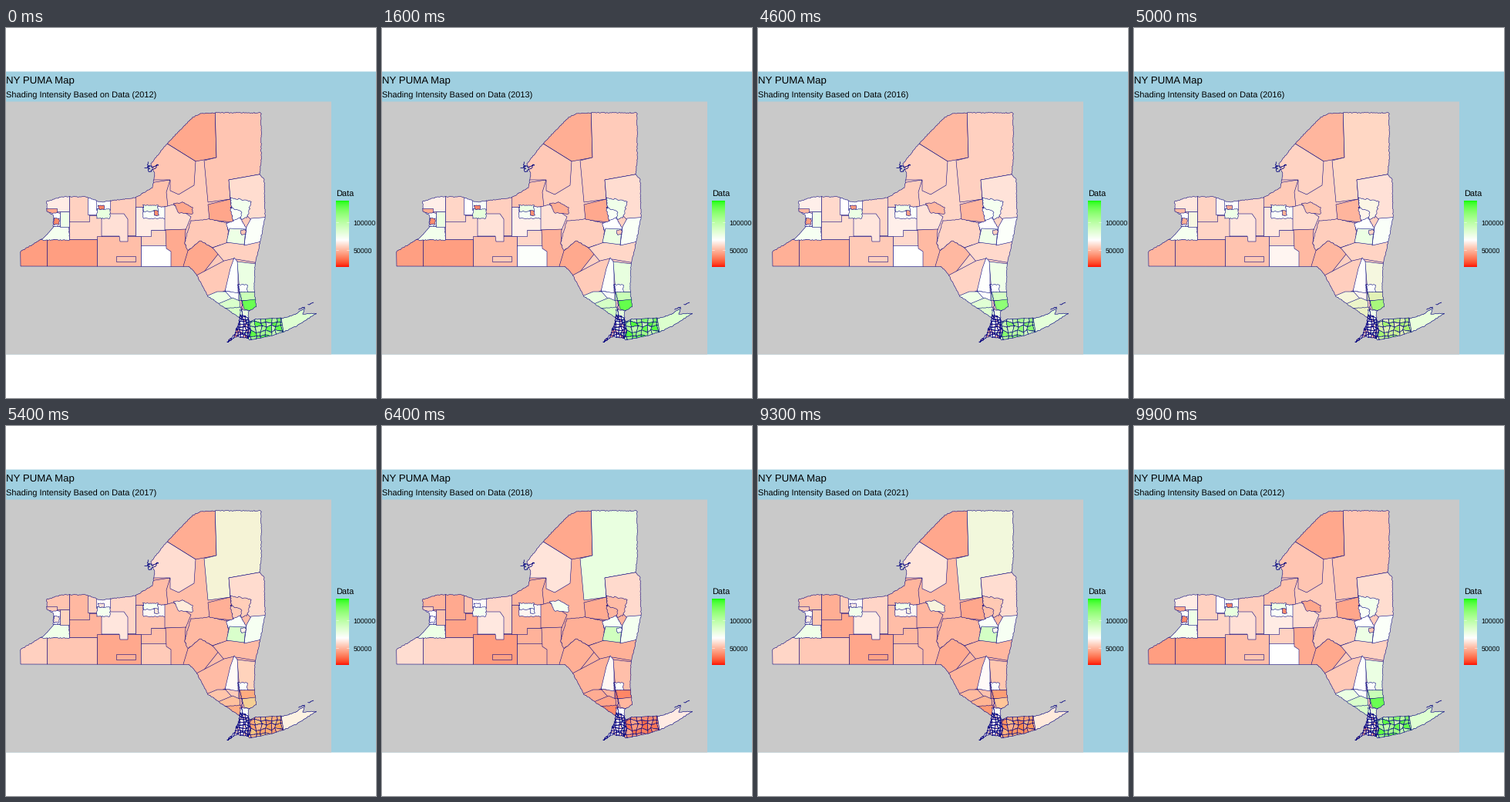
A matplotlib script that plays this animation: 480x480 px, repeating every 10000 ms.

```python
import numpy as np
import matplotlib.pyplot as plt
from matplotlib.animation import FuncAnimation
from matplotlib.collections import PolyCollection
from matplotlib.patches import Polygon, Rectangle

plt.rcParams["text.hinting"] = "none"
SIZE, DPI = 480, 80
PX = 72 / DPI
NAVY = "#00007f"
YEARS = [*range(2012, 2020), 2021]
# first and last frame of each blend into the following year
SPANS = [(4, 13), (16, 23), (28, 36), (39, 46), (50, 56),
         (60, 66), (74, 78), (82, 90), (93, 99)]

WHITE = np.array([100.0, 0, 0])
RED = np.array([53.2, 80.1, 67.2])
GREEN = np.array([87.7, -86.2, 83.2])
XYZ_TO_RGB = np.array([[3.2406, -1.5372, -0.4986],
                       [-0.9689, 1.8758, 0.0415],
                       [0.0557, -0.2040, 1.0570]])
rng = np.random.default_rng(12)
layers = []


def shade(v):
    """Lab colour on the red - white - green scale, v in -1..1."""
    v = np.asarray(v, float)[..., None]
    t = np.abs(v)
    return WHITE * (1 - t) + np.where(v < 0, RED, GREEN) * t


def lab_to_rgb(lab):
    fy = (lab[..., 0] + 16) / 116
    f = np.stack([fy + lab[..., 1] / 500, fy, fy - lab[..., 2] / 200], -1)
    xyz = np.where(f > 6 / 29, f ** 3, 3 * (6 / 29) ** 2 * (f - 4 / 29))
    lin = np.clip((xyz * [0.9505, 1, 1.089]) @ XYZ_TO_RGB.T, 0, 1)
    return np.where(lin > 0.0031308,
                    1.055 * np.maximum(lin, 1e-9) ** (1 / 2.4) - 0.055, 12.92 * lin)


def series(early, late):
    """Yearly values: slow rise to 2015, a flatter 2016, then a new level."""
    rise, step = rng.uniform(0, 0.08), rng.uniform(-0.01, 0.015)
    first = [early + rise * i / 3 for i in range(4)]
    return first + [0.82 * early] + [late + step * i for i in range(4)]


def rough(points, amp):
    """Resample a path every 1.5 px with a little noise."""
    p = np.asarray(points, float)
    dist = np.r_[0, np.cumsum(np.hypot(*np.diff(p, axis=0).T))]
    s = np.linspace(0, dist[-1], int(dist[-1] / 1.5) + 2)
    path = np.stack([np.interp(s, dist, p[:, i]) for i in (0, 1)], -1)
    return path + rng.uniform(-amp, amp, path.shape)


def region(early, late, *xy, rag=0):
    p = np.reshape(xy, (-1, 2)).astype(float)
    if rag:
        p = rough(np.vstack([p, p[:1]]), rag)
    return p, series(early / 100, late / 100)


def box(early, late, x0, y0, x1, y1, rag=0):
    return region(early, late, x0, y0, x1, y0, x1, y1, x0, y1, rag=rag)


def net(xs, ys, jitter, early, late):
    """Jittered grid cells with values drawn from two ranges."""
    gx, gy = np.meshgrid(xs, ys)
    g = np.stack([gx, gy], -1) + rng.uniform(-jitter, jitter, gx.shape + (2,))
    return [region(rng.uniform(*early), rng.uniform(*late),
                   *np.ravel([g[i, j], g[i, j + 1], g[i + 1, j + 1], g[i + 1, j]]),
                   rag=0.35)
            for i in range(len(ys) - 1) for j in range(len(xs) - 1)]


def add_layer(outline, regions, lw):
    """Regions painted in order and cut off at the outline."""
    shapes, levels = zip(*regions)
    mesh = PolyCollection(shapes, edgecolors=NAVY, linewidths=lw * PX)
    ax.add_collection(mesh, autolim=False)
    edge = ax.add_patch(Polygon(outline, fc="none", ec=NAVY, lw=lw * PX, zorder=3))
    mesh.set_clip_path(edge)
    layers.append((mesh, shade(levels)))


def label(x, y, text, size):
    return ax.text(x, y, text, fontsize=size * PX, family="Liberation Sans")


fig = plt.figure(figsize=(SIZE / DPI, SIZE / DPI), dpi=DPI, facecolor="white")
ax = fig.add_axes([0, 0, 1, 1])
ax.axis("off")
ax.add_patch(Rectangle((0, 56.5), 480, 367, fc="#9fcfe0", lw=0, snap=False))
ax.add_patch(Rectangle((0, 95.5), 422, 328, fc="#c9c9c9", lw=0, snap=False))

coast = [(19, 290), (49, 272), (61, 259), (62, 243), (53, 238), (53, 225),
         (72, 219), (105, 219), (122, 226), (137, 224), (168, 220), (190, 207),
         (193, 190), (188, 176), (209, 150), (242, 116), (252, 111), (271, 110),
         (331, 110), (331, 172), (329, 190), (335, 196), (336, 247), (323, 308),
         (322, 342), (325, 361), (314, 368), (315, 380), (306, 378), (297, 372),
         (262, 348), (246, 318), (237, 309)]
mainland = np.vstack([rough(coast, 0.5), [(19, 309)]])

north = [
    box(-27, -39, 0, 100, 345, 400),
    region(-45, -45, 209, 150, 200, 100, 271, 100, 273, 168, 246, 173),
    region(-30, 16, 271, 100, 345, 100, 345, 187, 289, 197, 291, 222, 262, 226,
           257, 172, 273, 168),
    region(-32, -38, 160, 205, 213, 197, 208, 213, 210, 232, 168, 233),
    region(-30, -15, 209, 150, 246, 173, 244, 204, 224, 216, 213, 211, 213, 197,
           180, 197, 180, 165),
]
west = [
    box(-50, -18, 10, 260, 53, 320),
    box(-50, -25, 53, 274, 118, 320),
    box(8, 13, 40, 257, 82, 275, rag=0.7),
    box(-10, -40, 45, 210, 82, 238),
    box(-45, -25, 50, 234, 66, 241),
    box(2, 0, 55, 240, 71, 257, rag=0.6),
    box(12, -32, 70, 238, 82, 258),
    box(-60, 0, 62, 247, 69, 255, rag=0.7),
    box(-22, -47, 82, 243, 124, 274),
    box(-24, -44, 82, 210, 108, 251),
    box(-34, -52, 118, 270, 175, 320),
    box(-26, -22, 130, 215, 168, 269),
    region(-16, -13, 124, 247, 131, 241, 153, 241, 158, 248, 158, 277, 148, 277,
           147, 270, 124, 270),
    box(-30, -48, 143, 296, 168, 303),
    box(0, -32, 106, 210, 119, 242),
    box(2, -3, 117, 215, 135, 236),
    box(16, 6, 118, 235, 135, 247, rag=0.6),
    box(-62, 0, 120, 230, 127, 235, rag=0.7),
]
center = [
    box(-24, -40, 175, 262, 208, 283),
    region(-10, -40, 168, 232, 207, 232, 207, 262, 188, 262, 188, 270, 168, 270),
    box(3, -5, 178, 232, 207, 247, rag=0.6),
    box(12, 5, 178, 230, 197, 238, rag=0.7),
    box(-58, 4, 192, 237, 198, 243, rag=0.7),
    box(0, -38, 175, 282, 214, 320),
    region(-18, -40, 206, 232, 217, 229, 240, 245, 233, 262, 206, 262),
    region(-45, 6, 218, 228, 229, 226, 242, 233, 242, 241, 224, 240, rag=0.6),
    region(-44, -40, 207, 262, 233, 261, 232, 280, 240, 291, 237, 320, 214, 320,
           214, 290, 208, 286),
    region(-46, -43, 262, 229, 291, 222, 295, 252, 264, 249),
    region(-45, -41, 236, 289, 252, 275, 277, 291, 246, 330, 230, 309),
    region(-28, -42, 240, 250, 264, 248, 288, 253, 288, 279, 268, 285, 252, 276,
           236, 289, 232, 280, 235, 266, rag=0.5),
    region(-24, -41, 268, 285, 288, 278, 345, 274, 345, 308, 299, 300, 283, 303),
]
capital = [
    region(-18, -20, 289, 197, 345, 187, 345, 249, 318, 249, 291, 221),
    region(9, -36, 291, 220, 318, 225, 313, 246, 296, 252, rag=0.9),
    region(4, -38, 291, 233, 306, 238, 304, 251, 295, 252, rag=0.7),
    region(0, 5, 286, 254, 304, 246, 313, 262, 288, 262, rag=0.6),
    region(3, 8, 318, 247, 345, 245, 345, 274, 309, 282, 312, 258),
    region(13, 32, 290, 260, 311, 261, 309, 281, 286, 278),
    box(-30, 4, 305, 262, 311, 268, rag=0.6),
]
valley = [
    region(-28, -40, 230, 330, 283, 302, 296, 299, 290, 328, 284, 341, 250, 355),
    region(1, -4, 296, 298, 301, 304, 301, 344, 296, 352, 284, 342, 291, 312),
    region(14, -33, 300, 303, 340, 308, 340, 342, 303, 343),
    box(2, 2, 302, 333, 313, 343, rag=0.6),
    region(14, -43, 250, 352, 274, 342, 291, 342, 296, 351, 276, 365),
    region(2, -38, 284, 341, 302, 344, 302, 356, 292, 350),
    region(26, -47, 270, 360, 294, 350, 303, 354, 304, 363, 290, 370),
    box(36, -62, 302, 342, 340, 353),
    region(82, -38, 306, 354, 340, 350, 340, 372, 309, 365),
    region(28, -60, 284, 364, 304, 362, 306, 369, 300, 380, rag=0.6),
    box(16, 0, 304, 366, 320, 385, rag=0.7),
]
add_layer(mainland, north + west + center + capital + valley, 0.55)

island = rough([(313, 383), (322, 378), (362, 376), (376, 371), (388, 363),
                (385, 371), (403, 370), (378, 386), (361, 394), (345, 399),
                (315, 405), (313, 383)], 0.5)
towns = net(np.linspace(311, 364, 9), np.linspace(375, 406, 6), 2.2,
            (30, 90), (-75, -45))
east_end = region(23, -10, 356, 370, 410, 350, 410, 400, 361, 400)
add_layer(island, towns + [east_end], 0.6)

city = rough([(304, 372), (314, 376), (317, 392), (314, 403), (299, 400),
              (287, 408), (297, 397), (302, 382), (304, 372)], 0.8)
add_layer(city, net(np.linspace(286, 318, 10), np.linspace(371, 409, 12), 1.5,
                    (-55, 25), (-30, 12)), 0.8)

# Bays, islets and the lower river
for path, amp in [([(181, 181), (198, 178), (186, 186), (184, 175)], 1.4),
                  ([(301, 333), (306, 357), (306, 376), (300, 392)], 0.8),
                  ([(380, 365), (387, 362)], 0.5),
                  ([(392, 359), (399, 356)], 0.5)]:
    ax.plot(*rough(path, amp).T, color=NAVY, lw=0.8 * PX)

label(0, 72, "NY PUMA Map", 13.2)
subtitle = label(0, 91, "", 11)
label(428, 218, "Data", 11)

# Legend
BAR_TOP, BAR_MID, BAR_END = 224, 275, 310
rows = np.arange(BAR_TOP, BAR_END) + 0.5
scale = np.interp(rows, [BAR_TOP, BAR_MID, BAR_END], [1, 0, -1])
ax.imshow(lab_to_rgb(shade(scale))[:, None], aspect="auto", zorder=1,
          extent=(428, 445, BAR_END, BAR_TOP), interpolation="nearest")
for y, name in [(252.3, "100000"), (288.3, "50000")]:
    label(450.6, y + 3.2, name, 8.8)
    for x in (428, 441.6):
        ax.plot([x, x + 3.4], [y, y], color="white", lw=0.5 * PX)
ax.set_xlim(0, SIZE)
ax.set_ylim(SIZE, 0)


def phase(frame):
    """Current year index and how far it has blended into the next."""
    k = next(i for i, (_, last) in enumerate(SPANS) if frame <= last)
    start, last = SPANS[k]
    return k, max(0, (frame - start + 1) / (last - start + 1))


def update(frame):
    k, p = phase(frame)
    after = (k + 1) % len(YEARS)
    for mesh, lab in layers:
        mesh.set_facecolor(lab_to_rgb(lab[:, k] * (1 - p) + lab[:, after] * p))
    year = YEARS[after if p >= 0.5 else k]
    subtitle.set_text(f"Shading Intensity Based on Data ({year})")
    return [subtitle]


anim = FuncAnimation(fig, update, frames=100, interval=100, repeat=True,
                     repeat_delay=0, blit=False)
plt.show()
```
